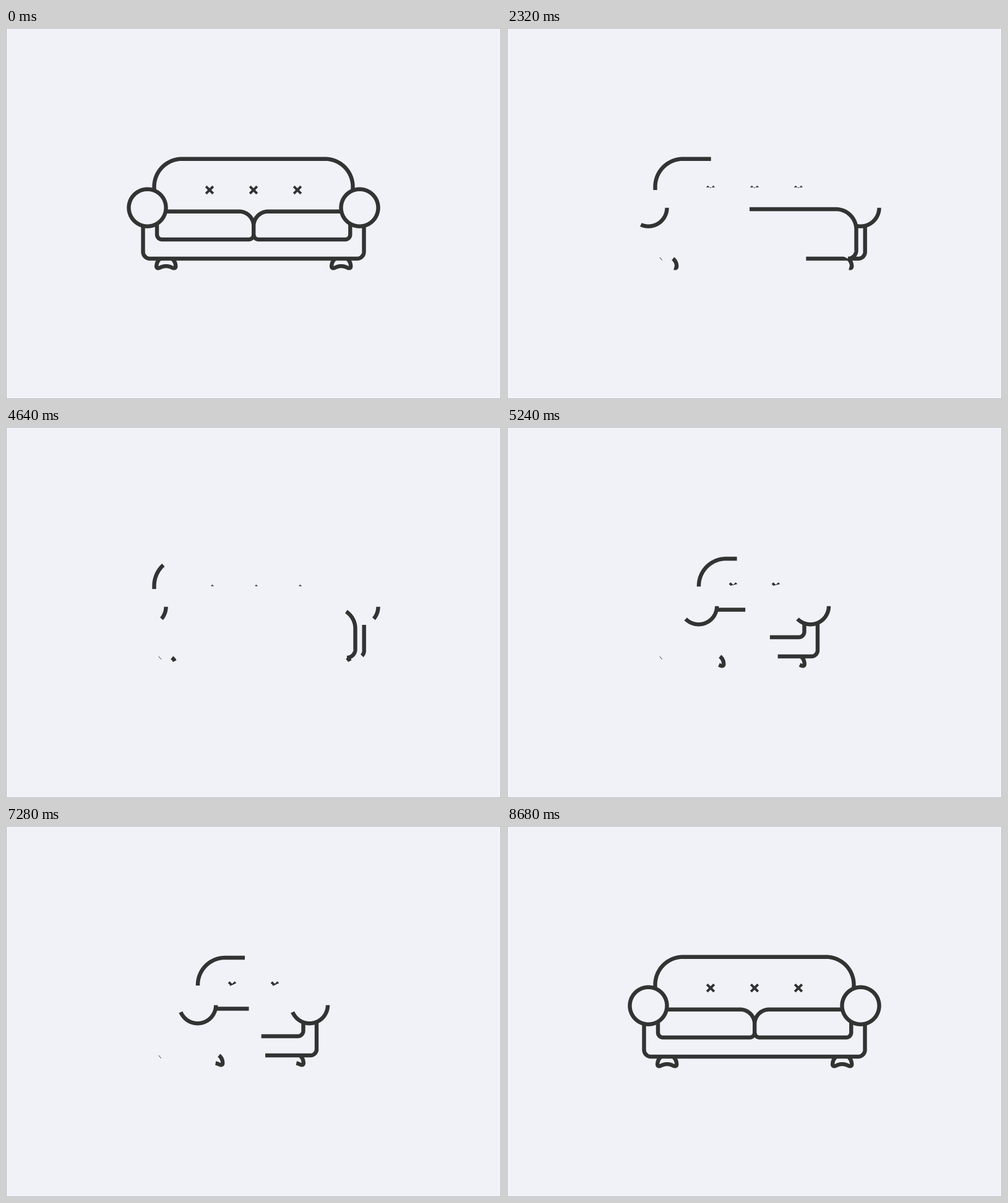
Write an HTML page with a canvas that moves like this. It is 800 px wide and 600 px high and loops after 9.64 s.

```html
<!DOCTYPE html>
<html lang="en">
<head>
<meta charset="utf-8">
<title>Sofa line drawing</title>
<style>
  html, body { margin: 0; height: 100%; overflow: hidden; background: #f1f2f8; }
  canvas { display: block; }
</style>
</head>
<body>
<canvas id="stage" width="800" height="600"></canvas>
<script>
const INK = '#333', PAPER = '#f1f2f8';
const LOOP = 9640, STEP = 40, SPAN = 960;
const ctx = document.getElementById('stage').getContext('2d');

// A path sampled densely, so that any leading part can be filled and stroked.
function shape(d, solid = false) {
  const el = document.createElementNS('http://www.w3.org/2000/svg', 'path');
  el.setAttribute('d', d);
  const length = el.getTotalLength(), count = Math.ceil(length * 2);
  const points = Array.from({ length: count + 1 }, (_, i) => el.getPointAtLength(length * i / count));
  return { el, length, points, solid, closed: d.endsWith('z') };
}

const circle = (x, y, r) =>
  shape(`M${x + r} ${y}a${r} ${r} 0 0 1 ${-2 * r} 0a${r} ${r} 0 0 1 ${2 * r} 0z`);

const leg = (x, y) => shape(`M${x + 9.5} ${y}c5 4 6 9 6 13c-.5 3.5-4 2.5-7 1
  c-5-2.5-12-2.5-17 0c-3 1.5-6.5 2.5-7-1c0-4 1-9 6-13`);

// Diagonal cross outline: arm reach l, half width h.
function cross(x, y, l) {
  const h = 2, a = (l - h) / Math.SQRT2, b = (l + h) / Math.SQRT2, n = h * Math.SQRT2;
  const corners = [[b, -a], [a, -b], [0, -n], [-a, -b], [-b, -a], [-n, 0],
                   [-b, a], [-a, b], [0, n], [a, b], [b, a], [n, 0]];
  return shape('M' + corners.map(([dx, dy]) => `${x + dx} ${y + dy}`).join('L') + 'z', true);
}

const wideBack = 'M239.5 262V257A45 45 0 0 1 284.5 211.7H515.5A45 45 0 0 1 560.5 257V262';
const wideCrosses = [329, 400, 471].map(x => cross(x, 262, 8.2));
const wideLegs = [leg(258.7, 373), leg(541.7, 373)];
const wideArms = [circle(228.5, 290.7, 30), circle(571.5, 290.7, 30)];

const twoSeater = [
  shape(wideBack), ...wideCrosses, ...wideLegs,
  shape('M221.5 319V362A11 11 0 0 0 232.5 373H567.5A11 11 0 0 0 578.5 362V319'),
  shape('M258 296.7H376.5A23.5 23.5 0 0 1 400.2 320V334A8 8 0 0 1 392.2 342H252A8 8 0 0 1 244 334V318'),
  shape('M556.3 318V334A8 8 0 0 1 548.3 342H408.2A8 8 0 0 1 400.2 334V320A23.5 23.5 0 0 1 423.7 296.7H542'),
  ...wideArms
];

const benchSeat = [
  shape(wideBack), ...wideCrosses, ...wideLegs,
  shape('M578.7 320V362A11 11 0 0 1 567.7 373H232.5A11 11 0 0 1 221.5 362V320'),
  ...wideArms,
  shape(`M551 373A13.5 13.5 0 0 0 564.5 359.5V326A33 33 0 0 0 531.5 293H268.7
    A33 33 0 0 0 235.7 326V359.5A13.5 13.5 0 0 0 249.2 373z`)
];

const armchair = [
  shape('M310 258V257A44 44 0 0 1 354 213H447A44 44 0 0 1 491 257V258'),
  cross(365.5, 258, 7.7), cross(434.5, 258, 7.7),
  leg(334.7, 371), leg(465.3, 371),
  shape('M502 317V361A10 10 0 0 1 492 371H308.2A10 10 0 0 1 298.2 361V317'),
  shape('M340 295.5H460'),
  shape('M480.5 317V331A9 9 0 0 1 471.5 340H329A9 9 0 0 1 320 331V317'),
  circle(309.7, 289.7, 29.5), circle(490.5, 289.7, 29.5)
];

function drawPart(s, part) {
  const last = Math.floor((s.points.length - 1) * part);
  const end = s.el.getPointAtLength(s.length * part);
  ctx.beginPath();
  for (let i = 0; i <= last; i++) ctx.lineTo(s.points[i].x, s.points[i].y);
  ctx.lineTo(end.x, end.y);
  if (s.closed && part === 1) ctx.closePath();
  ctx.fillStyle = s.solid ? INK : PAPER;
  ctx.fill();
  if (!s.solid) ctx.stroke();
}

// Eased 0 to 1 over one span beginning at start.
function ease(t, start) {
  const x = Math.min(1, Math.max(0, (t - start) / SPAN));
  return x * x * (3 - 2 * x);
}

function render(t) {
  ctx.fillStyle = PAPER;
  ctx.fillRect(0, 0, 800, 600);
  ctx.strokeStyle = '#b8b9be';
  ctx.lineWidth = 1;
  ctx.strokeRect(0.5, 0.5, 799, 599);

  ctx.strokeStyle = INK;
  ctx.beginPath();
  ctx.moveTo(246.7, 371);
  ctx.lineTo(250.8, 375.7);
  ctx.stroke();

  ctx.lineWidth = 6.4;
  ctx.lineJoin = 'round';
  const scenes = [
    [twoSeater, 1 - ease(t, 40) + ease(t, 7720)],
    [benchSeat, ease(t, 1960) - ease(t, 3880)],
    [armchair, ease(t, 4840) - ease(t, 6760)]
  ];
  for (const [shapes, part] of scenes)
    if (part > 0) shapes.forEach(s => drawPart(s, part));
}

const begin = performance.now();
function tick() {
  const t = (performance.now() - begin) % LOOP;
  render(Math.floor(t / STEP) * STEP);
  requestAnimationFrame(tick);
}
tick();
</script>
</body>
</html>
```
